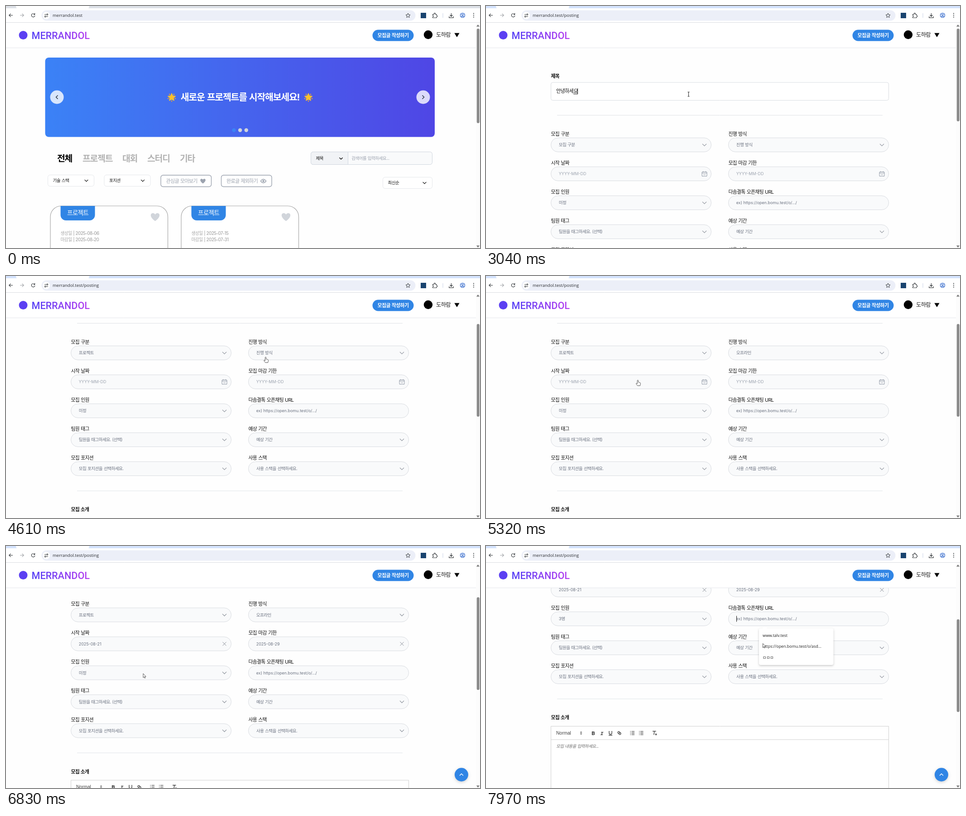
An HTML page with a canvas for the animation above (8000 ms loop, 1047 px wide and 535 px high).

```html
<!DOCTYPE html>
<html lang="ko">
<head>
<meta charset="utf-8">
<title>Merrandol</title>
<style>
  html, body { margin: 0; width: 100%; height: 100%; overflow: hidden; background: #fff; }
  canvas { display: block; }
</style>
</head>
<body>
<canvas id="stage" width="1047" height="535"></canvas>
<script>
const ctx = document.getElementById('stage').getContext('2d');
const LOOP = 8000;
const SANS = "Inter, 'Noto Sans CJK KR', sans-serif";
const UI = "'Open Sans', 'Noto Sans CJK KR', sans-serif";
const BLUE = '#3085e5', LINE = '#d9dce1', GRAY = '#6b7280', PALE = '#9ca3af', INK = '#1f2937';
const LEFT = 143.5, RIGHT = 535.5, FIELD_W = 354;

const clamp = v => Math.max(0, Math.min(1, v));
const ease = v => { v = clamp(v); return v * v * (3 - 2 * v); };
const span = (t, from, to) => (t - from) / (to - from);

// ---------- drawing helpers ----------
// y is the optical middle of the line
function text(s, x, y, size, color, { weight = 400, align = 'left', font = SANS, style = '' } = {}) {
  const tight = font === SANS && /[ㄱ-힣]/.test(s);
  if (!tight && font === SANS) size *= 0.93;
  ctx.font = `${style} ${weight} ${size}px ${font}`;
  ctx.letterSpacing = tight ? `${-0.06 * size}px` : '0px';
  ctx.wordSpacing = tight ? `${0.07 * size}px` : '0px';
  ctx.textAlign = align;
  ctx.fillStyle = color;
  ctx.fillText(s, x, y + size * 0.36);
  return ctx.measureText(s).width;
}

function box(x, y, w, h, radius, fill, border, width = 1) {
  ctx.beginPath();
  ctx.roundRect(x, y, w, h, radius);
  if (fill) { ctx.fillStyle = fill; ctx.fill(); }
  if (border) { ctx.strokeStyle = border; ctx.lineWidth = width; ctx.stroke(); }
}

function circle(x, y, r, fill) {
  ctx.beginPath();
  ctx.arc(x, y, r, 0, Math.PI * 2);
  ctx.fillStyle = fill;
  ctx.fill();
}

function shape(d, x, y, { fill, stroke, width = 1.2, scale = 1 }) {
  const path = new Path2D(d);
  ctx.save();
  ctx.translate(x, y);
  ctx.scale(scale, scale);
  ctx.lineWidth = width;
  if (fill) { ctx.fillStyle = fill; ctx.fill(path); }
  if (stroke) { ctx.strokeStyle = stroke; ctx.stroke(path); }
  ctx.restore();
}

function withShadow(draw, blur = 6, alpha = 0.18) {
  ctx.save();
  ctx.shadowColor = `rgba(0,0,0,${alpha})`;
  ctx.shadowBlur = blur;
  ctx.shadowOffsetY = 2;
  draw();
  ctx.restore();
}

const hline = (x1, x2, y, color) => shape(`M${x1} 0H${x2}`, 0, y + 0.5, { stroke: color, width: 1 });
const CHEVRON = { down: 'M-4.5 -2.2L0 2.3L4.5 -2.2', up: 'M-4 2L0 -2L4 2', left: 'M2 -4L-2 0L2 4', right: 'M-2 -4L2 0L-2 4' };
const HEART = 'M0 9C-13 0 -11 -8.5 -5 -8.5Q-1.5 -8.5 0 -5.5Q1.5 -8.5 5 -8.5C11 -8.5 13 0 0 9Z';

// ---------- browser frame ----------
function browser(t) {
  const focused = t >= 840, dark = '#3c4043';
  box(0, 0, 1047, 38, 0, '#fff');
  box(0, 0, 1047, 5, 0, focused ? '#d3e3fd' : '#dde1e7');
  box(22, -6, 162, 12, 5, '#fff');
  box(0, 5, 1047, 32, 0, '#fff');
  hline(0, 1047, 36, '#dadce0');
  shape('M4 0H-4M-.5 -3.7L-4.2 0L-.5 3.7', 11, 20.5, { stroke: dark });
  shape('M-4 0H4M.5 -3.7L4.2 0L.5 3.7', 35, 20.5, { stroke: '#a5a8ac' });
  shape('M3 -2.4A3.8 3.8 0 1 0 3.8 .8M3.6 -4.4V-1.6H.8', 60, 20.5, { stroke: dark });
  box(78.5, 9.5, 826, 23, 11.5, '#eceff8');
  circle(89, 21, 8, '#fff');
  shape('M-4 -2.2H0M0 2.2H4M3.6 -2.2A1.4 1.4 0 1 1 .8 -2.2A1.4 1.4 0 1 1 3.6 -2.2M-.8 2.2A1.4 1.4 0 1 1 -3.6 2.2A1.4 1.4 0 1 1 -.8 2.2', 89, 21, { stroke: dark, width: 1.1 });
  text(focused ? 'merrandol.test/posting' : 'merrandol.test', 103, 21, 9.5, '#2b2d30', { font: UI });
  shape('M0 -5L1.4 -1.6L5 -1.4L2.2 .9L3.1 4.4L0 2.5L-3.1 4.4L-2.2 .9L-5 -1.4L-1.4 -1.6Z', 888, 21, { stroke: dark, width: 1 });
  box(916, 15, 12, 12, 0, '#1a446f');
  shape('M-4.5 -2.5H-1.5Q-2 -5.3 0 -5.3Q2 -5.3 1.5 -2.5H4V0Q6 0 6 1.5Q6 3 4 3V5H-4.5V3Q-2.5 2.8 -2.5 1.3Q-2.5 0 -4.5 0Z', 947, 21, { stroke: dark });
  shape('M0 -5V5', 965, 21, { stroke: '#c9d3e6', width: 1 });
  shape('M0 -5V2M-3 -1L0 2L3 -1M-4.7 2V4.8H4.7V2', 983.5, 21, { stroke: dark, width: 1.3 });
  shape('M5 0A5 5 0 1 1 -5 0A5 5 0 1 1 5 0M1.8 -1.2A1.8 1.8 0 1 1 -1.8 -1.2A1.8 1.8 0 1 1 1.8 -1.2M-3.4 3.5Q0 .8 3.4 3.5', 1008.5, 20.5, { stroke: '#2a62c9' });
  for (const dy of [-4, 0, 4]) circle(1033, 20.5 + dy, 1.1, dark);
}

function scrollbar(scroll, height) {
  box(1038, 38, 9, 497, 0, '#fcfcfc');
  shape('M-3.5 2L0 -2.5L3.5 2Z', 1042.5, 43.5, { fill: '#777' });
  shape('M-3.5 -2L0 2.5L3.5 -2Z', 1042.5, 531.5, { fill: '#777' });
  box(1039.8, 50 + 0.409 * scroll, 6, height, 3, '#8b8b8b');
}

function siteHeader(t) {
  box(0, 38, 1038, 54, 0, '#fff');
  hline(0, 1038, 92, '#e5e7eb');
  circle(38, 64.5, 9.5, '#5b3ff2');
  const tint = ctx.createLinearGradient(57, 0, 184, 0);
  tint.addColorStop(0, '#5742f5');
  tint.addColorStop(1, '#b53cf0');
  text('MERRANDOL', 56.5, 65, 21.6, tint, { weight: 500, font: 'Roboto, sans-serif' });

  const hover = ease(span(t, 420, 510)) - ease(span(t, 840, 960));
  ctx.save();
  ctx.translate(855, 65);
  ctx.scale(1 + 0.05 * hover, 1 + 0.05 * hover);
  box(-45.5, -12.5, 91, 25, 12.5, BLUE);
  text('모집글 작성하기', 0, 0, 11, '#fff', { weight: 700, align: 'center' });
  ctx.restore();
  circle(932.5, 63.5, 9.7, '#000');
  text('도하람', 950, 63.5, 12.4, '#222', { weight: 500 });
  shape('M-5.6 -4.3H5.6L0 5Z', 996, 64, { fill: '#000' });
}

// ---------- home page ----------
function sparkle(x, y) {
  let star = '', rays = '';
  for (let i = 0; i < 10; i++) {
    const a = i * Math.PI / 5 - Math.PI / 2, r = i % 2 ? 5 : 10;
    star += `${i ? 'L' : 'M'}${Math.cos(a) * r} ${Math.sin(a) * r}`;
    if (i % 2) rays += `M${Math.cos(a) * 7} ${Math.sin(a) * 7}L${Math.cos(a) * 9.5} ${Math.sin(a) * 9.5}`;
  }
  shape(rays, x, y, { stroke: '#f0a030', width: 2.2 });
  shape(star + 'Z', x, y, { fill: '#fbc02d' });
}

function select(label, x, y, w, h = 25) {
  box(x, y, w, h, 5, '#fff', '#e5e7eb');
  text(label, x + 11, y + h / 2, 9.6, '#111', { weight: 500 });
  shape(CHEVRON.down, x + w - 17, y + h / 2, { stroke: '#111', scale: 0.85, width: 1.5 });
}

function card(x, created, closing) {
  box(x, 442, 259.5, 200, 24, '#fff', '#a9a9a9', 1.2);
  box(x + 22.5, 442, 76, 32, [0, 0, 12, 12], BLUE);
  text('프로젝트', x + 60.5, 457.5, 13.7, '#fff', { weight: 500, align: 'center' });
  shape(HEART, x + 231.5, 466.5, { fill: '#d1d5db' });
  text('생성일 | ' + created, x + 22.5, 503, 9.7, '#a6a6a6', { weight: 500 });
  text('마감일 | ' + closing, x + 22.5, 517, 9.7, '#a6a6a6', { weight: 500 });
}

function home() {
  const banner = ctx.createLinearGradient(87, 0, 947, 0);
  banner.addColorStop(0, '#3b82f6');
  banner.addColorStop(1, '#4f46e5');
  box(86.5, 114, 860.5, 175.5, 8, banner);
  text('새로운 프로젝트를 시작해보세요!', 517, 202, 20.5, '#fff', { weight: 700, align: 'center' });
  sparkle(366, 202);
  sparkle(668, 202);
  circle(112.5, 201.5, 15, 'rgba(255,255,255,.8)');
  circle(921.5, 201.5, 15, 'rgba(255,255,255,.8)');
  shape(CHEVRON.left, 112.5, 201.5, { stroke: INK, width: 1.4 });
  shape(CHEVRON.right, 921.5, 201.5, { stroke: INK, width: 1.4 });
  ['#3b82f6', '#d1d5db', '#d1d5db'].forEach((c, i) => circle(503.5 + 13.6 * i, 274.5, 4.2, c));

  [['전체', 113], ['프로젝트', 169], ['대회', 257], ['스터디', 312], ['기타', 384]].forEach(([label, x], i) =>
    text(label, x, 337, 19.3, i ? '#b3b3b3' : '#000', { weight: 700 }));
  box(673.5, 322.5, 268, 28, 5, '#f9fafb', '#cfd6df');
  box(673.5, 322.5, 82, 28, [5, 0, 0, 5], '#f1f3f6', '#cfd6df');
  text('제목', 684.5, 337, 9.6, '#111', { weight: 500 });
  shape(CHEVRON.down, 740, 337, { stroke: '#111', scale: 0.8, width: 1.8 });
  text('검색어를 입력하세요...', 763, 337, 9.6, PALE);

  select('기술 스택', 92.5, 373.5, 102);
  select('포지션', 217, 373.5, 102);
  select('최신순', 832.5, 378.5, 109);
  [['관심글 모아보기', 342], ['완료글 제외하기', 475.5]].forEach(([label, x]) => {
    box(x, 374, 111.5, 25.5, 5, '#fff', PALE, 1.4);
    text(label, x + 11.5, 387, 11, PALE, { weight: 500 });
  });
  shape(HEART, 435, 387, { fill: PALE, scale: 0.6 });
  shape('M-6 0Q0 -8 6 0Q0 8 -6 0Z', 568.5, 387, { stroke: PALE, width: 1.5 });
  circle(568.5, 387, 2.2, PALE);
  card(98, '2025-08-06', '2025-08-20');
  card(387, '2025-07-15', '2025-07-31');
}

// ---------- posting form (page coordinates, shifted by scroll) ----------
const TYPED = ['ㅇ', '아', '안', '안ㄴ', '안녀', '안녕', '안녕ㅎ', '안녕하', '안녕하ㅅ', '안녕하세', '안녕하세ㅇ', '안녕하세요'];

function titleInput(t) {
  text('제목', LEFT, 155, 10.8, '#111', { weight: 700 });
  box(LEFT, 169, 746, 39.5, 4, '#fff', LINE);
  if (t < 1580) { text('모집글의 제목을 입력하세요.', 155, 188.5, 11.1, PALE); return; }
  const step = t < 1810 ? 0 : Math.min(11, 1 + Math.floor((t - 1810) / 64));
  const value = TYPED[step], spaced = t >= 3070;
  const end = 155 + text(value, 155, 188.5, 11.1, '#111');
  if (!spaced) hline(end - 9.6, end, 194, '#111');
  const caretOn = t < 2710 || (t >= 3040 && Math.floor((t - 3040) / 530) % 2 === 0);
  if (caretOn) box(Math.round(end + (spaced ? 2.5 : -0.5)), 182, 1, 13, 0, '#111');
}

function field(row, x, label, value, { icon = 'down', color = GRAY } = {}) {
  const y = 291.5 + 64 * row, mid = y + 15.5;
  text(label, x, y - 8.5, 10.8, '#111');
  box(x, y, FIELD_W, 31, 15.5, '#f9fafb', LINE);
  text(value, x + 17.3, mid, 9.6, color);
  const ix = x + FIELD_W - 15;
  if (icon === 'down') shape(CHEVRON.down, ix, mid, { stroke: '#858b95', width: 1.1 });
  if (icon === 'cross') shape('M-4 -4L4 4M4 -4L-4 4', ix, mid, { stroke: '#858b95', width: 1 });
  if (icon === 'date') {
    box(ix - 5.5, mid - 4.5, 11, 10, 2, null, PALE, 1.1);
    shape('M-5.5 -1.6H5.5M-2.8 -6V-3.5M2.8 -6V-3.5M-2.6 2.3H2.8', ix, mid, { stroke: PALE, width: 1.1 });
  }
}

const dateField = (row, x, label, value) =>
  field(row, x, label, value || 'YYYY-MM-DD', value ? { icon: 'cross' } : { icon: 'date', color: PALE });

function editor() {
  hline(157, 876, 611.5, '#dfe5e8');
  text('모집 소개', LEFT, 653.5, 10.8, '#111', { weight: 700 });
  box(LEFT, 672.5, 746, 200, 0, '#fff', '#d0d0d0');
  hline(LEFT, 889.5, 701.5, '#d0d0d0');
  const y = 687.5, ink = '#444', roboto = 'Roboto, sans-serif';
  text('Normal', 155, y, 10.2, ink, { weight: 500, font: "'Liberation Sans', sans-serif" });
  shape('M-2.3 -1L0 -3.6L2.3 -1ZM-2.3 1L0 3.6L2.3 1Z', 210, y, { fill: ink });
  text('B', 237, y, 11.5, ink, { weight: 800, align: 'center', font: roboto });
  text('I', 256, y, 11.5, ink, { weight: 700, align: 'center', style: 'italic', font: "'Liberation Mono', monospace" });
  shape('M-3 -4.5V0Q-3 3 0 3Q3 3 3 0V-4.5M-4 5H4', 275, y, { stroke: ink, width: 1.4 });
  shape('M1 -2A2.3 2.3 0 1 0 -2 1L.8 .8M-1 2A2.3 2.3 0 1 0 2 -1L-.8 -.8', 294.5, y, { stroke: ink, width: 1.4 });
  for (const x of [323.5, 343]) shape('M-2 -3.6H4.5M-2 0H4.5M-2 3.6H4.5M-5 -3.6H-3.6M-5 0H-3.6M-5 3.6H-3.6', x, y, { stroke: ink, width: 1.3 });
  shape('M-4.5 -4H3M-.5 -4L-1.8 4M1.5 1.5L4.5 4.5M4.5 1.5L1.5 4.5', 372.5, y, { stroke: ink, width: 1.4 });
  text('모집 내용을 입력하세요...', 155, 716.5, 9.5, '#707070', { style: 'italic' });
}

function dropdown(row, x, options) {
  const top = 326.5 + 64 * row;
  withShadow(() => box(x, top, FIELD_W, options.length * 28, 8, '#fff', LINE));
  options.forEach((label, i) => text(label, x + 17.3, top + 14 + 28 * i, 9.6, GRAY));
}

function calendar(x, alpha) {
  if (alpha <= 0) return;
  ctx.save();
  ctx.globalAlpha = alpha;
  ctx.translate(x, 398);
  withShadow(() => box(0, 0, 214, 252, 5, '#fff', '#dfe2e6'), 3, 0.1);
  shape('M-8 0.6L0 -7L8 0.6', 199, 0, { fill: '#fff', stroke: '#dfe2e6', width: 1 });
  box(5.5, 6, 203, 35, 4, '#fff', '#dfe2e6');
  shape(CHEVRON.left, 24, 24, { stroke: GRAY });
  shape(CHEVRON.right, 191, 24, { stroke: GRAY });
  const mid = { align: 'center' };
  text('AUG', 72, 24, 10.2, GRAY, mid);
  text('2025', 142, 24, 10.4, GRAY, mid);
  const column = i => 24.8 + 27.45 * i;
  ['Sun', 'Mon', 'Tue', 'Wed', 'Thu', 'Fri', 'Sat'].forEach((d, i) => text(d, column(i), 55.5, 10, PALE, mid));
  hline(10, 203, 67, '#e2e5e9');
  for (let i = 0; i < 42; i++) {
    const day = i - 4, inMonth = day >= 1 && day <= 31;
    const label = String(day < 1 ? day + 31 : day > 31 ? day - 31 : day);
    const cx = column(i % 7), cy = 84 + 28.9 * Math.floor(i / 7);
    const color = inMonth && day !== 20 ? '#565e69' : '#a3a9b3';
    text(label, cx, cy, 10, color, mid);
    if (day < 20) hline(cx - 3 * label.length, cx + 3 * label.length, cy, color);
  }
  ctx.restore();
}

function suggestions() {
  withShadow(() => box(603, 456, 164.5, 81, 4, '#fff'), 4, 0.2);
  shape('M-6 .5L0 -4.5L6 .5Z', 616, 456, { fill: '#fff' });
  ['www.talv.test', 'https://open.bomu.test/o/asd...', 'ㅁㅁㅁ'].forEach((s, i) =>
    text(s, 611, 471.5 + 24.5 * i, 8.9, '#222', { font: UI }));
}

function form(t) {
  titleInput(t);
  hline(157, 876, 241, '#dfe2e6');
  field(0, LEFT, '모집 구분', t < 4400 ? '모집 구분' : '프로젝트');
  field(0, RIGHT, '진행 방식', t < 5050 ? '진행 방식' : '오프라인');
  dateField(1, LEFT, '시작 날짜', t >= 5830 && '2025-08-21');
  dateField(1, RIGHT, '모집 마감 기한', t >= 6560 && '2025-08-29');
  field(2, LEFT, '모집 인원', t < 7480 ? '미정' : '3명');
  field(2, RIGHT, '다솜결톡 오픈채팅 URL', 'ex) https://open.bomu.test/o/.../', { icon: '' });
  field(3, LEFT, '팀원 태그', '팀원을 태그하세요. (선택)');
  field(3, RIGHT, '예상 기간', '예상 기간');
  field(4, LEFT, '모집 포지션', '모집 포지션을 선택하세요.');
  field(4, RIGHT, '사용 스택', '사용 스택을 선택하세요.');
  editor();

  if (t >= 3900 && t < 4400) dropdown(0, LEFT, ['프로젝트', '대회', '스터디', '기타']);
  if (t >= 4700 && t < 5050) dropdown(0, RIGHT, ['온라인', '오프라인', '온/오프라인']);
  if (t >= 7250 && t < 7480) dropdown(2, LEFT, ['미정', ...Array.from({ length: 9 }, (_, i) => `${i + 1}명`)]);
  calendar(283, clamp(span(t, 5400, 5510)) - clamp(span(t, 5830, 5930)));
  calendar(675, clamp(span(t, 5993, 6108)) - clamp(span(t, 6560, 6620)));
  if (t >= 7820) {
    box(553, 428.5, 1, 13, 0, '#111');
    suggestions();
  }
}

function topButton() {
  withShadow(() => circle(1006, 505.5, 15, BLUE));
  shape(CHEVRON.up, 1006, 505.5, { stroke: '#fff', width: 1.4 });
}

// ---------- pointer: [time, x, y, kind from then on] ----------
const POINTER = [
  [60, 990, 461, 'arrow'], [430, 862, 80, 'hand'], [510, 856, 63, 'hand'], [840, 856, 63, 'arrow'],
  [1200, 482, 213.5, 'arrow'], [1420, 447.5, 195, 'beam'], [3310, 447.5, 195, 'arrow'],
  [3650, 270, 240, 'arrow'], [3850, 240, 166, 'hand'], [4110, 242, 208, 'hand'], [4170, 237, 200, 'hand'],
  [4400, 237, 200, 'hand'], [4610, 573.5, 179, 'hand'], [4700, 574, 172, 'hand'], [4820, 574, 232, 'hand'],
  [5020, 574, 232, 'hand'], [5350, 330, 230, 'hand'], [5420, 330, 230, 'hand'], [5800, 417, 428, 'hand'],
  [5830, 417, 428, 'hand'], [5990, 586, 236, 'hand'], [6100, 586, 251, 'hand'], [6480, 837, 457, 'hand'],
  [6600, 837, 457, 'arrow'], [6830, 303, 282, 'arrow'], [7110, 300, 230, 'arrow'], [7230, 240, 160, 'hand'],
  [7430, 240, 274, 'hand'], [7500, 240, 274, 'arrow'], [7800, 612, 160, 'beam'], [7880, 612, 185, 'arrow'],
  [7970, 611.5, 215.5, 'arrow']
];

function pointer(t) {
  const i = POINTER.findLastIndex(key => key[0] <= t);
  if (i < 0) return;
  const [t0, x0, y0, kind] = POINTER[i], [t1, x1, y1] = POINTER[i + 1] || [LOOP, x0, y0];
  const k = ease(span(t, t0, t1)), x = x0 + (x1 - x0) * k, y = y0 + (y1 - y0) * k;
  const skin = { fill: '#fff', stroke: '#333', width: 0.8 };
  if (kind === 'arrow') shape('M0 0V9L2 7.2L3.5 10.2L4.8 9.6L3.4 6.7H6.2Z', x, y, skin);
  if (kind === 'hand') shape('M-1.1 .8Q0 -.8 1.1 .8V4.6L5 5.6Q6.3 6.2 5.8 9L5 12.5H-.6L-3.8 8.3Q-3.8 6.7 -2.4 7.1L-1.1 8.2Z', x, y, skin);
  if (kind === 'beam') shape('M-2 -4.8H2M0 -4.8V4.8M-2 4.8H2', x, y, { stroke: '#222', width: 1 });
}

function render(t) {
  const onForm = t >= 840;
  const scroll = 137 * (ease(span(t, 3370, 3760)) + ease(span(t, 6750, 7110)));
  box(0, 0, 1047, 535, 0, '#fefefe');
  if (onForm) {
    ctx.save();
    ctx.translate(0, -scroll);
    form(t);
    ctx.restore();
  } else home();
  if (scroll > 145) topButton();
  siteHeader(t);
  scrollbar(scroll, onForm ? 205 : 209);
  browser(t);
  pointer(t);
}

const start = performance.now();
function tick() {
  render((performance.now() - start) % LOOP);
  requestAnimationFrame(tick);
}
tick();
</script>
</body>
</html>
```
